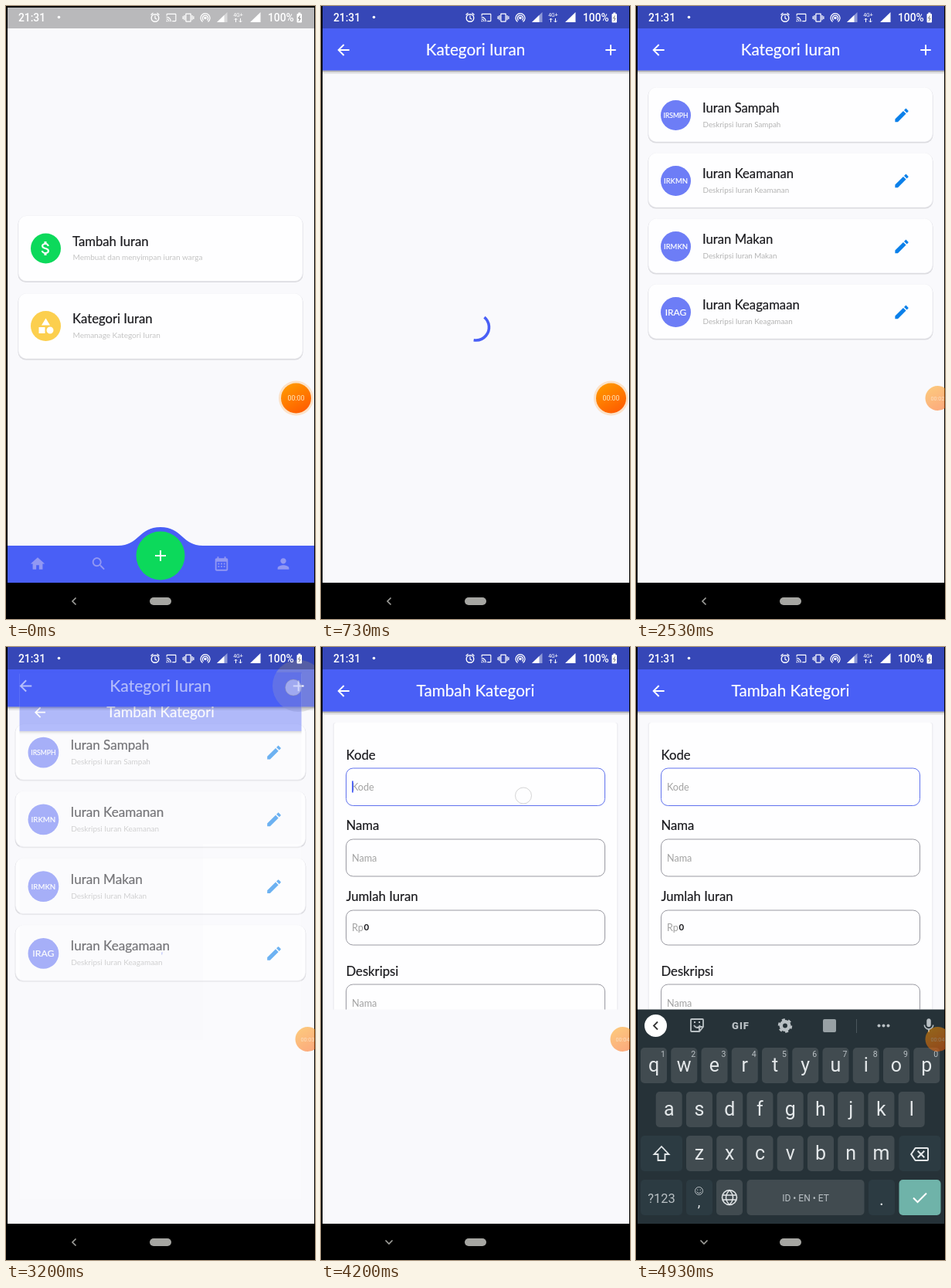
These frames come from a looping animation (400 px wide and 794 px high, 4.99 s). An HTML page:

```html
<!DOCTYPE html>
<html lang="id">
<head>
<meta charset="utf-8">
<title>Kategori Iuran</title>
<style>
html, body { margin: 0; width: 100%; height: 100%; overflow: hidden; background: #000; }
svg { display: block; width: 400px; height: 794px; }
text { font-family: Lato, sans-serif; }
.ui { font-family: Roboto, sans-serif; }
.semi { stroke: currentColor; stroke-width: .2px; }
</style>
</head>
<body>
<svg id="stage" viewBox="0 0 400 794"></svg>
<script>
const LOOP = 4990, BLUE = '#495ff6', PAPER = '#f9f9fc', GREEN = '#0cd95b', INK = '#1a1a1e';
const ICON = {
  home: 'M10 20v-6h4v6h5v-8h3L12 3 2 12h3v8z',
  search: 'M15.5 14h-.79l-.28-.27C15.41 12.59 16 11.11 16 9.5 16 5.91 13.09 3 9.5 3S3 5.91 3 9.5 5.91 16 9.5 16c1.61 0 3.09-.59 4.23-1.57l.27.28v.79l5 4.99L20.49 19zm-6 0C7.01 14 5 11.99 5 9.5S7.01 5 9.5 5 14 7.01 14 9.5 11.99 14 9.5 14z',
  date: 'M9 11H7v2h2zm4 0h-2v2h2zm4 0h-2v2h2zM9 15H7v2h2zm4 0h-2v2h2zm4 0h-2v2h2zm2-11h-1V2h-2v2H8V2H6v2H5c-1.1 0-2 .9-2 2v14c0 1.1.9 2 2 2h14c1.1 0 2-.9 2-2V6c0-1.1-.9-2-2-2zm0 16H5V9h14z',
  person: 'M12 12c2.21 0 4-1.79 4-4s-1.79-4-4-4-4 1.79-4 4 1.79 4 4 4zm0 2c-2.67 0-8 1.34-8 4v2h16v-2c0-2.66-5.33-4-8-4z',
  add: 'M19 13h-6v6h-2v-6H5v-2h6V5h2v6h6z',
  back: 'M20 11H7.83l5.59-5.59L12 4l-8 8 8 8 1.41-1.41L7.83 13H20z',
  edit: 'M3 17.25V21h3.75L17.81 9.94l-3.75-3.75zM20.71 7.04c.39-.39.39-1.02 0-1.41l-2.34-2.34c-.39-.39-1.02-.39-1.41 0l-1.83 1.83 3.75 3.75z',
  money: 'M11.8 10.9c-2.27-.59-3-1.2-3-2.15 0-1.09 1.01-1.85 2.7-1.85 1.78 0 2.44.85 2.5 2.1h2.21c-.07-1.72-1.12-3.3-3.21-3.81V3h-3v2.16c-1.94.42-3.5 1.68-3.5 3.61 0 2.31 1.91 3.46 4.7 4.13 2.5.6 3 1.48 3 2.41 0 .69-.49 1.79-2.7 1.79-2.06 0-2.87-.92-2.98-2.1h-2.2c.12 2.19 1.76 3.42 3.68 3.83V21h3v-2.15c1.95-.37 3.5-1.5 3.5-3.55 0-2.84-2.43-3.81-4.7-4.4z',
  category: 'M12 2l-5.5 9h11zM3 13.5h8v8H3zM13 17.5a4.5 4.5 0 1 0 9 0a4.5 4.5 0 1 0-9 0z',
  cast: 'M21 3H3c-1.1 0-2 .9-2 2v3h2V5h18v14h-7v2h7c1.1 0 2-.9 2-2V5c0-1.1-.9-2-2-2zM1 18v3h3c0-1.66-1.34-3-3-3zm0-4v2c2.76 0 5 2.24 5 5h2c0-3.87-3.13-7-7-7zm0-4v2c4.97 0 9 4.03 9 9h2c0-6.08-4.93-11-11-11z',
  vibrate: 'M0 15h2V9H0zm3 2h2V7H3zm19-8v6h2V9zm-3 8h2V7h-2zM16.5 3h-9C6.67 3 6 3.67 6 4.5v15c0 .83.67 1.5 1.5 1.5h9c.83 0 1.5-.67 1.5-1.5v-15c0-.83-.67-1.5-1.5-1.5zM16 19H8V5h8z',
  erase: 'M22 3H7c-.69 0-1.23.35-1.59.88L0 12l5.41 8.11c.36.53.9.89 1.59.89h15c1.1 0 2-.9 2-2V5c0-1.1-.9-2-2-2zm0 16H7.07L2.4 12l4.66-7H22zm-11.59-2L14 13.41 17.59 17 19 15.59 15.41 12 19 8.41 17.59 7 14 10.59 10.41 7 9 8.41 12.59 12 9 15.59z',
  mic: 'M12 14c1.66 0 3-1.34 3-3V5c0-1.66-1.34-3-3-3S9 3.34 9 5v6c0 1.66 1.34 3 3 3zm5.3-3c0 3-2.54 5.1-5.3 5.1S6.7 14 6.7 11H5c0 3.41 2.72 6.23 6 6.72V21h2v-3.28c3.28-.48 6-3.3 6-6.72z'
};

// Markup helpers
const icon = (name, x, y, size, fill) =>
  `<path d="${ICON[name]}" fill="${fill}" transform="translate(${x - size / 2} ${y - size / 2}) scale(${size / 24})"/>`;
const rect = (x, y, w, h, fill, r = 0, more = '') =>
  `<rect x="${x}" y="${y}" width="${w}" height="${h}" rx="${r}" fill="${fill}" ${more}/>`;
const disc = (x, y, r, fill, more = '') => `<circle cx="${x}" cy="${y}" r="${r}" fill="${fill}" ${more}/>`;
const line = (d, color, w = 1.5, more = '') =>
  `<path d="${d}" fill="none" stroke="${color}" stroke-width="${w}" ${more}/>`;
const text = (s, x, y, size, fill, more = '') =>
  `<text x="${x}" y="${y}" font-size="${size}" fill="${fill}" ${more}>${s}</text>`;
const MID = 'text-anchor="middle"', UI = 'class="ui"', UIMID = UI + ' ' + MID;
const bold = color => `class="semi" style="color:${color}"`;
const heading = (s, x, y) => text(s, x, y, 16.7, INK, bold(INK));

const card = (y, h) =>
  rect(15.5, y + .5, 369, h + 1.5, '#dcdce0', 10) + rect(16, y - .5, 368, h + 1, '#f2f2f6', 10) +
  rect(16.5, y, 367, h, '#fefeff', 10);
const page = (id, body) =>
  `<g id="${id}">${rect(0, 2, 400, 746, PAPER)}${body}</g>`;
const appBar = title =>
  rect(0, 83, 400, 5, '#555', 0, 'opacity=".12"') + rect(0, 83, 400, 2.5, '#444', 0, 'opacity=".3"') +
  rect(0, 0, 400, 83.5, BLUE) + icon('back', 29, 57, 23, '#fff') +
  text(title, 200, 64, 20.7, '#fff', MID + ' ' + bold('#fff'));
const spinner = id =>
  `<circle id="${id}" cx="200.5" cy="416" r="17" fill="none" stroke="${BLUE}" stroke-width="3.6" pathLength="360"/>`;

function homePage() {
  const row = (y, color, glyph, title, sub) =>
    card(y, 84) + disc(51.5, y + 42, 19.5, color) + icon(glyph, 51.5, y + 42, 24, '#fff') +
    heading(title, 86, y + 38.5) + text(sub, 86.5, y + 57, 10, '#c4c4c4');
  const tabs = [['home', 41], ['search', 120], ['date', 279], ['person', 359]];
  return row(272, GREEN, 'money', 'Tambah Iuran', 'Membuat dan menyimpan iuran warga') +
    row(372.5, '#fccf4e', 'category', 'Kategori Iuran', 'Memanage Kategori Iuran') +
    `<g clip-path="url(#cardClip)">${disc(215, 420, 0, '#bbb', 'id="cardInk"')}</g>` +
    `<path d="M0 699H145C172 699 172 675 200 675S228 699 255 699H400V748H0z" fill="${BLUE}"/>` +
    tabs.map(([n, x]) => icon(n, x, 722.5, 22, '#9298f3')).join('') +
    disc(200, 712, 31.5, GREEN) + icon('add', 200, 712, 24, '#fff');
}

function listPage() {
  const rows = [['IRSMPH', 8.5, 'Sampah'], ['IRKMN', 9.5, 'Keamanan'], ['IRMKN', 9.5, 'Makan'], ['IRAG', 12, 'Keagamaan']];
  const list = rows.map(([code, size, name], i) => {
    const y = 105.5 + 85 * i;
    return card(y, 70) + disc(51.5, y + 36, 19.5, '#6d7df6') +
      text(code, 51.5, y + 36 + size * .36, size, '#fff', MID + ' ' + bold('#fff')) +
      heading('Iuran ' + name, 86, y + 32.5) +
      text('Deskripsi Iuran ' + name, 86.5, y + 51, 9.8, '#b4b4b4') +
      icon('edit', 344, y + 36, 23, '#0b80ea');
  }).join('');
  return `<g id="list">${list}</g>` + spinner('listSpin') +
    appBar('Kategori Iuran') + disc(375, 57, 0, '#b4b4b4', 'id="addInk"') + icon('add', 375, 57, 23, '#fff');
}

function formPage() {
  const field = (label, labelY, y, h, hint, id = '') =>
    heading(label, 32.5, labelY) +
    rect(32.5, y, 335, h, 'none', 9, `stroke="#9a9aa2" ${id}`) + text(hint, 40, y + h / 2 + 4.5, 12.6, '#a2a2a2');
  const fields = rect(15.5, 98, 369, 487, '#eeeef2', 3) + rect(17, 98, 366, 485.5, '#fefeff', 3) +
    field('Kode', 145.5, 157, 48.5, 'Kode', 'id="focus"') +
    field('Nama', 237, 249, 48, 'Nama') +
    field('Jumlah Iuran', 328.5, 341, 45, 'Rp') + text('0', 55.5, 367, 11.5, INK, 'font-weight="700"') +
    field('Deskripsi', 425.5, 437, 48, 'Nama') +
    rect(40, 173.5, 1.8, 15, BLUE, 0, 'id="caret"') +
    rect(0, 469.5, 400, 279, PAPER, 0, 'id="inset"');
  return `<g id="fields">${fields}</g>` + spinner('formSpin') + appBar('Tambah Kategori');
}

function keyboard() {
  const ink = '#e4e8ea', dim = '#b9c0c4', dark = '#2c3b42', pitch = 39.25;
  const key = (x, y, w, fill = '#414b50') => rect(x, y, w, 46, fill, 5);
  const letters = (s, x, y) => [...s].map((c, i) =>
    key(x - 17 + pitch * i, y, 34) + text(c, x + pitch * i, y + 31, 25, ink, UIMID)).join('');
  const digits = [...'1234567890'].map((c, i) => text(c, 35 + pitch * i, 531, 10.5, dim, UIMID)).join('');
  const bar = disc(25.5, 490.5, 14.5, '#fff') + line('M28 485.5l-5 5 5 5', '#333', 1.8) +
    line('M72 482h14a1 1 0 0 1 1 1v9l-5 6h-10a1 1 0 0 1-1-1v-14a1 1 0 0 1 1-1zM87 492h-5v6M75 490q4 6 8 0M75 486h2M81 486h2', dim, 1.8) +
    text('GIF', 135.5, 495, 13, dim, UIMID + ' font-weight="900" letter-spacing="1"') +
    disc(193, 490.5, 5.2, 'none', `stroke="${dim}" stroke-width="4.5"`) +
    disc(193, 490.5, 8, 'none', `stroke="${dim}" stroke-width="2.5" pathLength="16" stroke-dasharray="1.3 1.367"`) +
    rect(242, 482, 17, 17, '#98a1a5', 2) + line('M285.5 482v18', '#4a565c', 1) +
    [314.5, 320.5, 326.5].map(x => disc(x, 490.5, 2, dim)).join('') + icon('mic', 379, 490.5, 22, dim);
  return rect(0, 469.5, 400, 280, '#263238') + bar +
    letters('qwertyuiop', 23, 519) + digits + letters('asdfghjkl', 42.7, 576) + letters('zxcvbnm', 82, 633) +
    key(6, 633, 54, dark) + line('M33 647l-9.5 10h5v8h9v-8h5z', ink, 1.8) +
    key(340.5, 633, 54, dark) + icon('erase', 367, 657, 24, ink) +
    key(6, 690, 54, dark) + text('?123', 33, 719.5, 16.5, dim, UIMID) +
    key(65, 690, 34, dark) + disc(81.5, 704.5, 5, 'none', `stroke="${dim}"`) +
    line('M78.5 705.5q3 4 6 0M79.7 702.5v1.3M83.3 702.5v1.3', dim, 1) + text(',', 81.5, 725, 18, ink, UIMID) +
    key(104, 690, 34) + disc(121, 713, 9.5, 'none', `stroke="${ink}" stroke-width="1.5"`) +
    line('M121 703.5q-9 9.5 0 19q9-9.5 0-19M112 710h18M112 716h18', ink, 1.4) +
    key(143.5, 690, 152) + text('ID • EN • ET', 219.5, 717.5, 12, dim, UIMID) +
    key(301, 690, 34, dark) + text('.', 318, 723, 22, ink, UIMID) +
    key(340.5, 690, 54, '#6fb3a9') + line('M359 713.5l5.5 5.5 11.5-11.5', '#fff', 2);
}

function statusBar() {
  const w = '#fff';
  return rect(0, 0, 400, 29, '#000', 0, 'opacity=".26"') +
    text('21:31', 16, 20, 13.8, w, UI + ' font-weight="500"') + disc(68.5, 14.5, 1.8, w) +
    disc(193, 15.5, 4.8, 'none', 'stroke="#fff" stroke-width="1.4"') +
    line('M193 12.5v3.3l2.3 1.4M187.5 11.5l3-2.5M198.5 11.5l-3-2.5', w, 1.2) +
    icon('cast', 214, 15, 14, w) + icon('vibrate', 236, 15, 15, w) +
    disc(258, 15.5, 1.8, w) + line('M255.7 18.5a3.6 3.6 0 1 1 4.6 0M254.5 20.5a6 6 0 1 1 7 0', w, 1.3) +
    `<path d="M273 21h13.5V8z" fill="#fff" opacity=".45"/><path d="M273 21h9.5v-9.2zM316 21h13.5V8z" fill="#fff"/>` +
    text('4G+', 300.5, 13.5, 7, w, UIMID) +
    line('M297.5 21v-5m-1.8 1.8l1.8-1.8 1.8 1.8M303.5 16v5m-1.8-1.8l1.8 1.8 1.8-1.8', w, 1) +
    text('100%', 339, 20, 13.8, w, UI + ' font-weight="500"') +
    rect(376.5, 10, 6.5, 11.5, w, 1) + rect(378.3, 8.5, 3, 2, w) + line('M380.5 12.5l-2 3.5h2.6l-2 3.5', '#777', 1);
}

const $ = id => document.getElementById(id);
$('stage').innerHTML = `<defs>
  <clipPath id="screen"><rect x="2" width="397" height="747"/></clipPath>
  <clipPath id="cardClip"><rect x="16.5" y="372.5" width="367" height="84" rx="10"/></clipPath>
  <linearGradient id="orange" x2=".6" y2="1"><stop stop-color="#ffa000"/><stop offset="1" stop-color="#ff5f00"/></linearGradient>
  </defs>
  <g clip-path="url(#screen)">${page('home', homePage())}${page('listPage', listPage())}${page('form', formPage())}
  <g id="keys">${keyboard()}</g>${statusBar()}</g>` +
  line('', '#a0a09c', 1.6, 'id="navBack"') + rect(186, 766, 28, 10, '#a6a6a2', 5) +
  `<g id="bubble">${disc(0, 0, 22.5, '#ff9a30', 'id="halo"')}${disc(0, 0, 19.5, 'url(#orange)')}
  ${text('00:00', 0, 3.2, 8.8, '#ffe9bd', UIMID + ' id="timer"')}</g>` +
  disc(0, 0, 10.5, 'rgba(255,255,255,.4)', 'id="touch" stroke="rgba(150,150,150,.4)"');

// Timing helpers
const clamp = x => Math.min(1, Math.max(0, x));
const span = (t, from, to) => clamp((t - from) / (to - from));
const set = (id, attrs) => { for (const k in attrs) $(id).setAttribute(k, attrs[k]); };
const show = (id, on) => { $(id).style.display = on ? '' : 'none'; };

// Cubic bezier (.4, 0, .2, 1)
function ease(x) {
  let lo = 0, hi = 1, u = .5;
  for (let i = 0; i < 18; i++) {
    u = (lo + hi) / 2;
    const bx = 1.2 * u * (1 - u) ** 2 + .6 * u * u * (1 - u) + u ** 3;
    if (bx < x) lo = u; else hi = u;
  }
  return u * u * (3 - 2 * u);
}

// Quick start, then a very long settle
const zoomEase = p => p < 1 / 6 ? .4 * (6 * p) ** 3 : 1 - .6 * (1 - (p - 1 / 6) * 1.2) ** 7;
const zoom = s => `translate(200 374) scale(${s}) translate(-200 -374)`;

function openPage(t, start, from, to) {
  const p = span(t, start, start + 300), v = zoomEase(p);
  show(from, p < 1);
  show(to, p > 0);
  set(from, { transform: zoom(1 + .05 * v) });
  set(to, { transform: zoom(.85 + .15 * v), opacity: span(p, .115, .25) });
}

function ink(id, t, start, radius, held) {
  const grow = ease(span(t, start, start + held));
  set(id, { r: grow * radius, opacity: .42 * span(t, start, start + 60) * (1 - span(t, start + held, start + held + 300)) });
}

// Spins from start until the content is ready
function load(t, start, ready, spin, content) {
  const age = Math.max(0, t - start), turns = Math.floor(age / 1333), p = age / 1333 % 1;
  const head = ease(clamp(2 * p)), tail = ease(clamp(2 * p - 1));
  show(content, t >= ready);
  show(spin, t < ready);
  set(spin, {
    'stroke-dasharray': `${Math.max(4, (head - tail) * 270)} 360`,
    transform: `rotate(${-90 + (tail + turns) * 270 + age / 2222 * 360} 200.5 416)`
  });
}

const TOUCHES = [[200, 330, 215, 420], [2940, 3230, 372, 52.5], [4030, 4240, 262, 192.5]];

function draw(t) {
  openPage(t, 450, 'home', 'listPage');
  if (t >= 3000) openPage(t, 3150, 'listPage', 'form'); else show('form', false);
  load(t, 483, 1470, 'listSpin', 'list');
  load(t, 3180, 3730, 'formSpin', 'fields');

  ink('cardInk', t, 200, 260, 300);
  ink('addInk', t, 2940, 33, 230);

  const focused = t >= 4170;
  set('focus', { stroke: focused ? '#6072ee' : '#9a9aa2' });
  show('caret', focused && t < 4670);
  show('inset', focused);
  set('navBack', { d: focused ? 'M83.5 768.5l4.5 4.5 4.5-4.5' : 'M90.5 766.5l-4.5 4.5 4.5 4.5' });
  show('keys', t >= 4270);
  set('keys', { transform: `translate(0 ${279 * (1 - span(t, 4270, 4470)) ** 2})` });

  const dock = ease(span(t, 2000, 2330));
  set('bubble', { transform: `translate(${375.5 + 15 * dock} 508) scale(${1 - .18 * dock})`, opacity: 1 - .5 * dock });
  set('halo', { opacity: .25 * (1 - dock) });
  set('timer', { fill: dock > .5 ? '#ffc98a' : '#ffe9bd' });
  $('timer').textContent = '00:0' + Math.floor(t / 1000);

  const touch = TOUCHES.find(([a, b]) => t >= a && t < b);
  show('touch', touch);
  if (touch) set('touch', { cx: touch[2], cy: touch[3] });
}

const began = performance.now();
function tick() {
  draw((performance.now() - began) % LOOP);
  requestAnimationFrame(tick);
}
tick();
</script>
</body>
</html>
```
